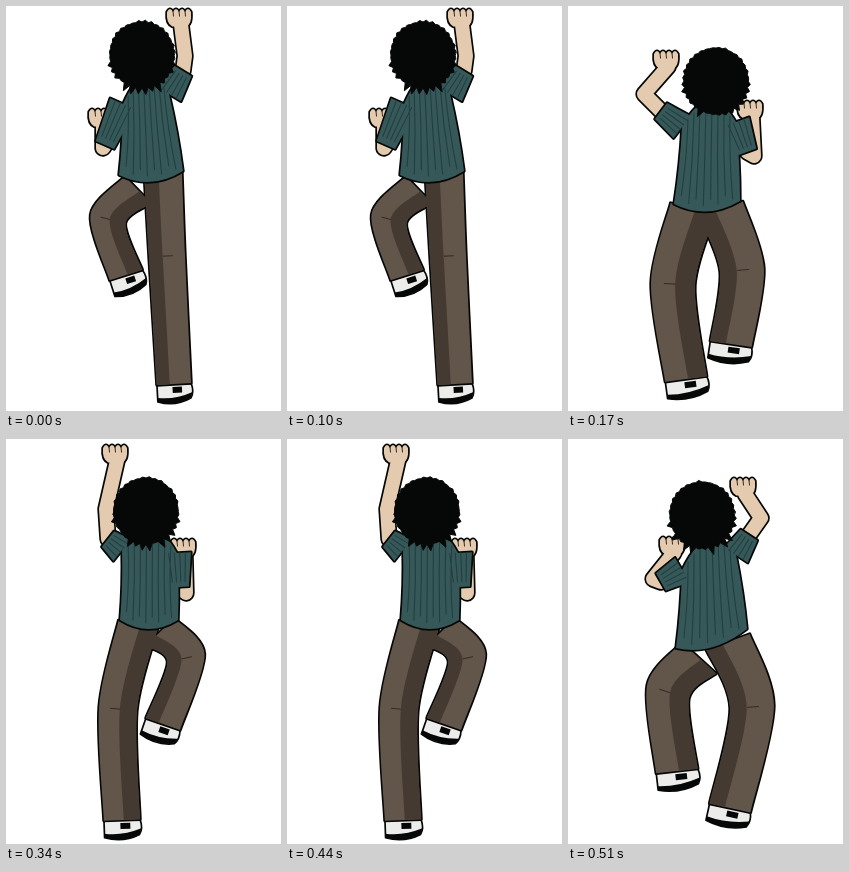
Recreate the animation shown at these times as an HTML page with a canvas. Size 275 by 405 pixels, loop 0.68 s.

```html
<!DOCTYPE html>
<html lang="en">
<head>
<meta charset="utf-8">
<title>Climbing dance</title>
<style>
html, body { margin: 0; width: 100%; height: 100%; overflow: hidden; background: #fff; }
canvas { display: block; width: 275px; height: 405px; }
</style>
</head>
<body>
<canvas id="stage"></canvas>
<script>
const W = 275, H = 405, HOLD = 170;
const INK = '#060707', SKIN = '#e4cbaf', SHIRT = '#365859', RIB = '#213f41';
const CLOTH = '#62554a', SHADE = '#443a31', CREASE = '#332a23', SHOE = '#ececea';
const HAIR = 32, HAND = 24, ARM = 14, SLEEVE = [28, 20], LEG = [42, 40, 38];

// Joints of the rig, left limb first.
// arm: shoulder, cuff, elbow, hand; leg: hip, knee, hem
const poses = [
  { head: [136, 49], bulk: 0.9, waist: [[113, 169], [177, 165]],
    arms: [[[117, 98], [99, 139], [97, 142], [95, 112]], [[163, 88], [177, 65], [179, 50], [173, 12]]],
    legs: [[[132, 184], [102, 213], [120, 269]], [[157, 165], [161, 250], [168, 378]]] },
  { head: [148, 75], bulk: 1.1, waist: [[106, 198], [172, 195]],
    arms: [[[114, 121], [93, 105], [76, 88], [98, 54]], [[168, 116], [179, 146], [186, 150], [182, 104]]],
    legs: [[[125, 203], [105, 278], [118, 373]], [[153, 203], [174, 264], [163, 338]]] },
  { head: [140, 72], bulk: 0.95, waist: [[114, 181], [172, 181]],
    arms: [[[116, 111], [102, 100], [100, 70], [109, 15]], [[171, 114], [173, 148], [180, 154], [177, 109]]],
    legs: [[[132, 186], [112, 270], [116, 381]], [[154, 193], [180, 219], [157, 285]]] },
  { head: [134, 76], bulk: 1.1, waist: [[108, 209], [179, 190]],
    arms: [[[114, 131], [93, 143], [85, 140], [104, 107]], [[168, 116], [181, 96], [193, 79], [175, 48]]],
    legs: [[[131, 219], [100, 253], [109, 332]], [[160, 203], [184, 268], [162, 369]]] }
];

const canvas = document.getElementById('stage');
const ctx = canvas.getContext('2d');
const dpr = window.devicePixelRatio || 1;
canvas.width = W * dpr;
canvas.height = H * dpr;
ctx.scale(dpr, dpr);
ctx.lineJoin = ctx.lineCap = 'round';

const mix = (a, b, t) => [a[0] + (b[0] - a[0]) * t, a[1] + (b[1] - a[1]) * t];
const shift = ([x, y], dx, dy) => [x + dx, y + dy];
const unit = (a, b) => {
  const d = Math.hypot(b[0] - a[0], b[1] - a[1]);
  return [(b[0] - a[0]) / d, (b[1] - a[1]) / d];
};

function seeded(seed) {
  return () => {
    seed = (seed * 16807) % 2147483647;
    return seed / 2147483647;
  };
}

function ink(path, width, color = INK) {
  ctx.lineWidth = width;
  ctx.strokeStyle = color;
  ctx.stroke(path);
}

function fill(path, color) {
  ctx.fillStyle = color;
  ctx.fill(path);
}

// Outline first, then fill, so that touching parts merge into one shape
function merge(paths, color, width = 3.4) {
  paths.forEach(p => ink(p, width));
  paths.forEach(p => fill(p, color));
}

function spline(path, pts, bend = 0.15) {
  const at = i => pts[Math.max(0, Math.min(pts.length - 1, i))];
  path.lineTo(...pts[0]);
  for (let i = 0; i < pts.length - 1; i++) {
    const [a, b, c, d] = [at(i - 1), at(i), at(i + 1), at(i + 2)];
    path.bezierCurveTo(
      b[0] + (c[0] - a[0]) * bend, b[1] + (c[1] - a[1]) * bend,
      c[0] - (d[0] - b[0]) * bend, c[1] - (d[1] - b[1]) * bend, ...c);
  }
}

// Point on a limb: joint i, v = 0..1 from side to side
function across(joints, widths, i, v) {
  const n = joints.length - 1;
  const before = unit(joints[Math.max(0, i - 1)], joints[Math.max(1, i)]);
  const after = unit(joints[Math.min(n - 1, i)], joints[Math.min(n, i + 1)]);
  const [dx, dy] = unit([0, 0], [before[0] + after[0], before[1] + after[1]]);
  const off = widths[i] * (v - 0.5);
  return shift(joints[i], dy * off, -dx * off);
}

// The part of a limb between two sides
function strip(joints, widths, from = 0, to = 1) {
  const edge = v => joints.map((_, i) => across(joints, widths, i, v));
  const path = new Path2D();
  path.moveTo(...edge(from)[0]);
  spline(path, edge(from));
  spline(path, edge(to).reverse());
  path.closePath();
  return path;
}

function drawShoe([, knee, hem], width) {
  const [dx, dy] = unit(knee, hem), w = width / 2;
  ctx.save();
  ctx.translate(...hem);
  ctx.rotate(Math.atan2(dy, dx) - Math.PI / 2);
  const body = new Path2D(`M${-w} 0H${w}Q${w + 3} 9 ${w - 1} 15Q0 23 ${-w} 17Z`);
  const sole = new Path2D(`M${-w} 13Q0 16 ${w + 1} 9L${w - 1} 15Q0 23 ${-w} 17Z`);
  fill(body, SHOE);
  fill(sole, INK);
  ctx.fillStyle = INK;
  ctx.fillRect(-w * 0.1, 3, w * 0.55, 6);
  ink(body, 1.7);
  ctx.restore();
}

function drawLegs({ legs, bulk }) {
  const widths = LEG.map(w => w * bulk);
  legs.forEach(leg => drawShoe(leg, widths[2]));
  merge(legs.map(leg => strip(leg, widths)), CLOTH);
  legs.forEach((leg, i) => {
    fill(i ? strip(leg, widths, 0, 0.38) : strip(leg, widths, 0.55, 1), SHADE);
    const fold = new Path2D();
    fold.moveTo(...across(leg, widths, 1, i ? 0.4 : 0.55));
    fold.lineTo(...across(leg, widths, 1, i ? 0.65 : 0.3));
    ink(fold, 1, CREASE);
  });
}

function drawArm([, cuff, elbow, hand]) {
  const [x, y] = hand, w = HAND, h = w * 0.7, bump = w / 4;
  const arm = new Path2D();
  [cuff, elbow, shift(hand, 2, h * 0.4)].forEach(p => arm.lineTo(...p));

  const left = x - w / 2, top = y - h * 0.35;
  const fist = new Path2D(), fingers = new Path2D();
  fist.moveTo(x - w * 0.28, y + h / 2);
  fist.quadraticCurveTo(left - 1, y + h * 0.35, left, top);
  for (let i = 0; i < 4; i++) {
    const fx = left + i * bump;
    fist.quadraticCurveTo(fx + bump / 2, top - 6, fx + bump, top);
    if (i) {
      fingers.moveTo(fx, top - 1);
      fingers.lineTo(fx + 0.5, top + 4);
    }
  }
  fist.quadraticCurveTo(x + w / 2 + 1, y + h * 0.4, x + w * 0.3, y + h / 2);
  fist.closePath();

  ink(arm, ARM + 3.4);
  ink(fist, 3.4);
  ink(arm, ARM, SKIN);
  fill(fist, SKIN);
  ink(fingers, 1, CREASE);
}

function drawShirt({ arms, waist }) {
  const [sl, sr] = arms.map(a => a[0]), [hl, hr] = waist;
  const neck = mix(sl, sr, 0.5), hem = mix(hl, hr, 0.5);
  const torso = new Path2D();
  torso.moveTo(...sl);
  torso.quadraticCurveTo(...shift(neck, 0, -48), ...sr);
  torso.quadraticCurveTo(...shift(mix(sr, hr, 0.5), 2, 0), ...hr);
  torso.quadraticCurveTo(...shift(hem, 0, 18), ...hl);
  torso.quadraticCurveTo(...shift(mix(sl, hl, 0.5), 2, 0), ...sl);
  torso.closePath();

  const sleeves = arms.map(a => a.slice(0, 2));
  merge([torso, ...sleeves.map(s => strip(s, SLEEVE))], SHIRT);

  const ribs = new Path2D(), count = 9;
  for (let i = 1; i < count; i++) {
    const t = i / count, arch = Math.sin(t * Math.PI);
    const top = shift(mix(sl, sr, t), 0, -20 * arch);
    const low = shift(mix(hl, hr, t), 0, 8 * arch - 5 - (i % 2) * 6);
    ribs.moveTo(...top);
    ribs.quadraticCurveTo(...shift(mix(top, low, 0.5), (0.5 - t) * 6, 0), ...low);
  }
  for (const s of sleeves) {
    for (let v = 0.2; v < 0.9; v += 0.2) {
      ribs.moveTo(...across(s, SLEEVE, 0, v));
      ribs.lineTo(...mix(across(s, SLEEVE, 0, v), across(s, SLEEVE, 1, v), 0.85));
    }
  }
  ink(ribs, 1.1, RIB);
}

// Round mop whose tips grow longer toward the nape
function drawHair([x, y], seed) {
  const rand = seeded(seed), tips = 64, path = new Path2D();
  for (let i = 0; i < tips; i++) {
    const a = i / tips * Math.PI * 2, low = Math.max(0, Math.sin(a));
    const r = HAIR + (i % 2) * rand() * (2 + 9 * low);
    path.lineTo(x + Math.cos(a) * r, y + Math.sin(a) * (r + 1));
  }
  path.closePath();
  fill(path, INK);
  ink(path, 1);
}

function draw(i) {
  const pose = poses[i];
  ctx.fillStyle = '#fff';
  ctx.fillRect(0, 0, W, H);
  drawLegs(pose);
  pose.arms.forEach(drawArm);
  drawShirt(pose);
  drawHair(pose.head, 71 + i * 977);
}

const start = performance.now();
function tick() {
  draw(Math.floor((performance.now() - start) / HOLD) % poses.length);
  requestAnimationFrame(tick);
}
tick();
</script>
</body>
</html>
```
